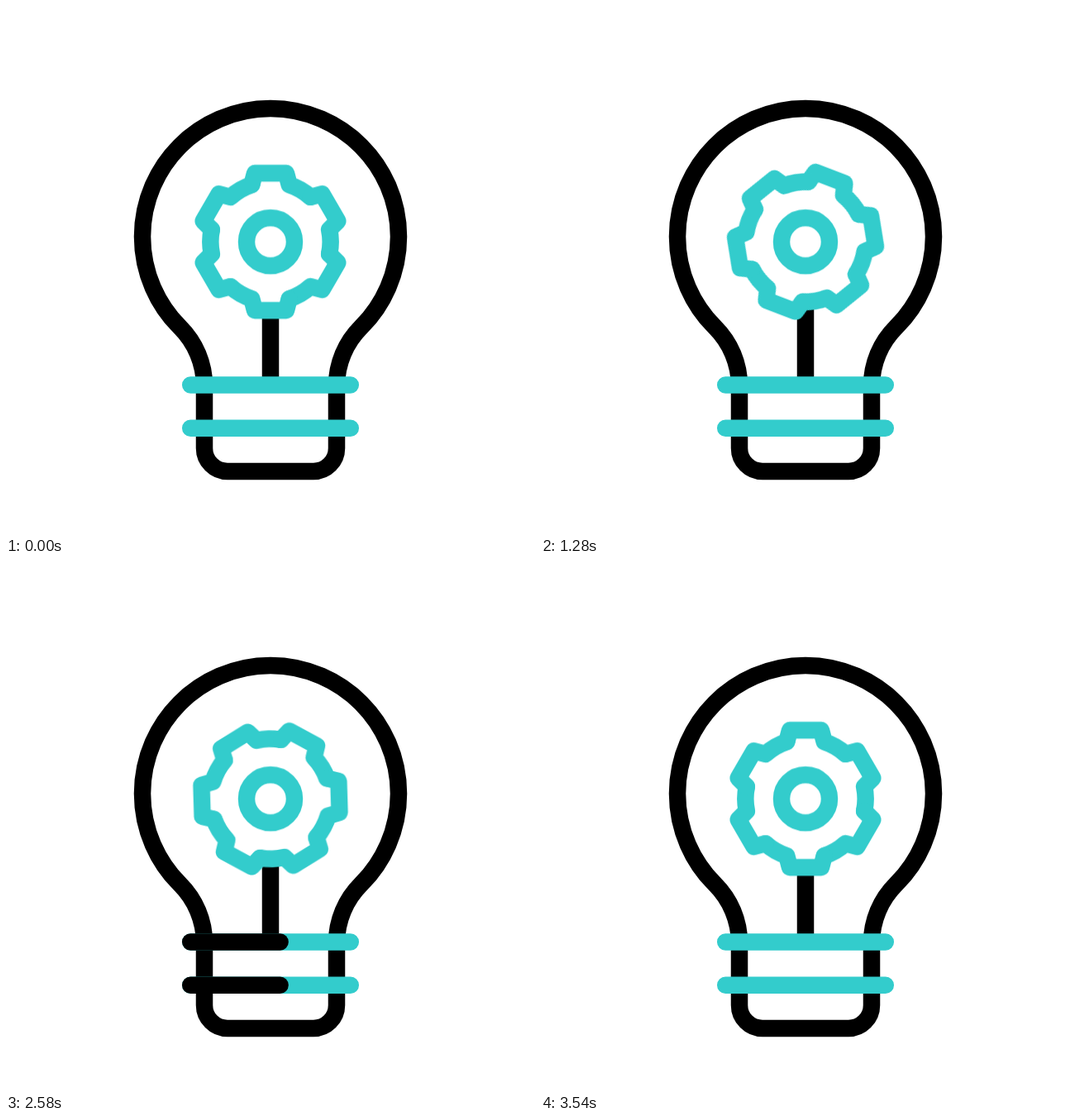
Recreate the animation shown at these times as an HTML page. Size 640 px wide and 640 px high, loop 3.6 s.

```html
<!DOCTYPE html>
<html lang="en">
<head>
<meta charset="utf-8">
<title>Idea bulb</title>
<style>
  @property --head { syntax: "<length>"; inherits: true; initial-value: 0px; }
  @property --tail { syntax: "<length>"; inherits: true; initial-value: 0px; }

  html, body { margin: 0; width: 100%; height: 100%; overflow: hidden; background: #fff; }
  svg { display: block; width: 100%; height: 100%; }

  svg * {
    --ease: cubic-bezier(.333, 0, .667, 1);
    animation: 3600ms var(--ease) infinite;
  }
  .line { fill: none; stroke-width: 20.5; stroke-linecap: round; stroke-linejoin: round; }
  .black { stroke: #000; }
  .teal { stroke: #3cc; }

  /* Shows only the stretch between --tail and --head */
  .trim {
    stroke-dasharray: calc(var(--head) - var(--tail)) 999px;
    stroke-dashoffset: calc(-1 * var(--tail));
  }

  .bulb { animation-name: hop; }
  .gear { animation-name: spin; }
  .pulse {
    animation-name: pulse-head, pulse-tail, pulse-show;
    animation-timing-function: var(--ease), var(--ease), step-end;
  }
  .rays {
    animation-name: ray-head, ray-tail, ray-show;
    animation-timing-function: var(--ease), var(--ease), step-end;
  }

  @keyframes hop {
    0%, 5.417%, 19.861%, 34.306%, 82.639%, 96.25%, 100% { transform: translateY(0); }
    12.639%, 27.083%, 89.444% { transform: translateY(-27px); }
  }
  @keyframes spin {
    0%, 25.472% { transform: rotate(0deg); }
    94.444%, 100% { transform: rotate(360deg); }
  }

  @keyframes pulse-head {
    0%, 36.667%, 54.31%, 65.694%, 83.34%, 100% { --head: 0px; }
    47.778%, 54.306%, 76.806%, 83.333% { --head: 193.6px; }
  }
  @keyframes pulse-tail {
    0%, 43.194%, 54.31%, 72.222%, 83.34%, 100% { --tail: 0px; }
    54.306%, 83.333% { --tail: 193.6px; }
  }
  @keyframes pulse-show {
    0%, 54.306%, 83.333%, 100% { opacity: 0; }
    36.667%, 65.694% { opacity: 1; }
  }

  @keyframes ray-head {
    0%, 87.778% { --head: 0px; }
    94.444%, 100% { --head: 35px; }
  }
  @keyframes ray-tail {
    0%, 91.667% { --tail: 0px; }
    98.333%, 100% { --tail: 35px; }
  }
  @keyframes ray-show {
    0%, 98.2%, 100% { opacity: 0; }
    87.778% { opacity: 1; }
  }
</style>
</head>
<body>
<svg viewBox="0 0 640 640">
  <defs>
    <path id="tooth" d="M-22.7 -69L-19 -83H19L22.7 -69A72.6 72.6 0 0 1 48.4 -54.2"/>
    <path id="ray" class="trim" d="M124 279H89"/>
    <path id="bands" d="M223.2 458.6H416.8M223.2 510.8H416.8"/>
  </defs>

  <g class="bulb line">
    <g class="rays teal">
      <use href="#ray"/>
      <use href="#ray" transform="rotate(45 320 279)"/>
      <use href="#ray" transform="rotate(90 320 279)"/>
      <use href="#ray" transform="rotate(135 320 279)"/>
      <use href="#ray" transform="rotate(180 320 279)"/>
    </g>

    <path class="black" d="M240 459.4A100.4 100.4 0 0 0 210.4 388.6A155 155 0 1 1 429.6 388.6
      A100.4 100.4 0 0 0 400 459.4V535A28 28 0 0 1 372 563H268A28 28 0 0 1 240 535Z"
      stroke-dasharray="none" style="clip-path: none" visibility="hidden"/>
    <path class="black" d="M240 459.4A100.4 100.4 0 0 0 210.4 388.6A155 155 0 1 1 429.6 388.6
      A100.4 100.4 0 0 0 400 459.4V535A28 28 0 0 1 372 563H268A28 28 0 0 1 240 535V459.4"/>
    <path class="black" d="M320 364V455" stroke-linecap="butt"/>

    <g transform="translate(320 285.3)">
      <g class="gear teal">
        <use href="#tooth"/>
        <use href="#tooth" transform="rotate(60)"/>
        <use href="#tooth" transform="rotate(120)"/>
        <use href="#tooth" transform="rotate(180)"/>
        <use href="#tooth" transform="rotate(240)"/>
        <use href="#tooth" transform="rotate(300)"/>
      </g>
      <circle class="teal" r="29"/>
    </g>

    <use class="teal" href="#bands"/>
    <g class="pulse black">
      <path class="trim" d="M223.2 458.6H416.8"/>
      <path class="trim" d="M223.2 510.8H416.8"/>
    </g>
  </g>
</svg>
</body>
</html>
```
